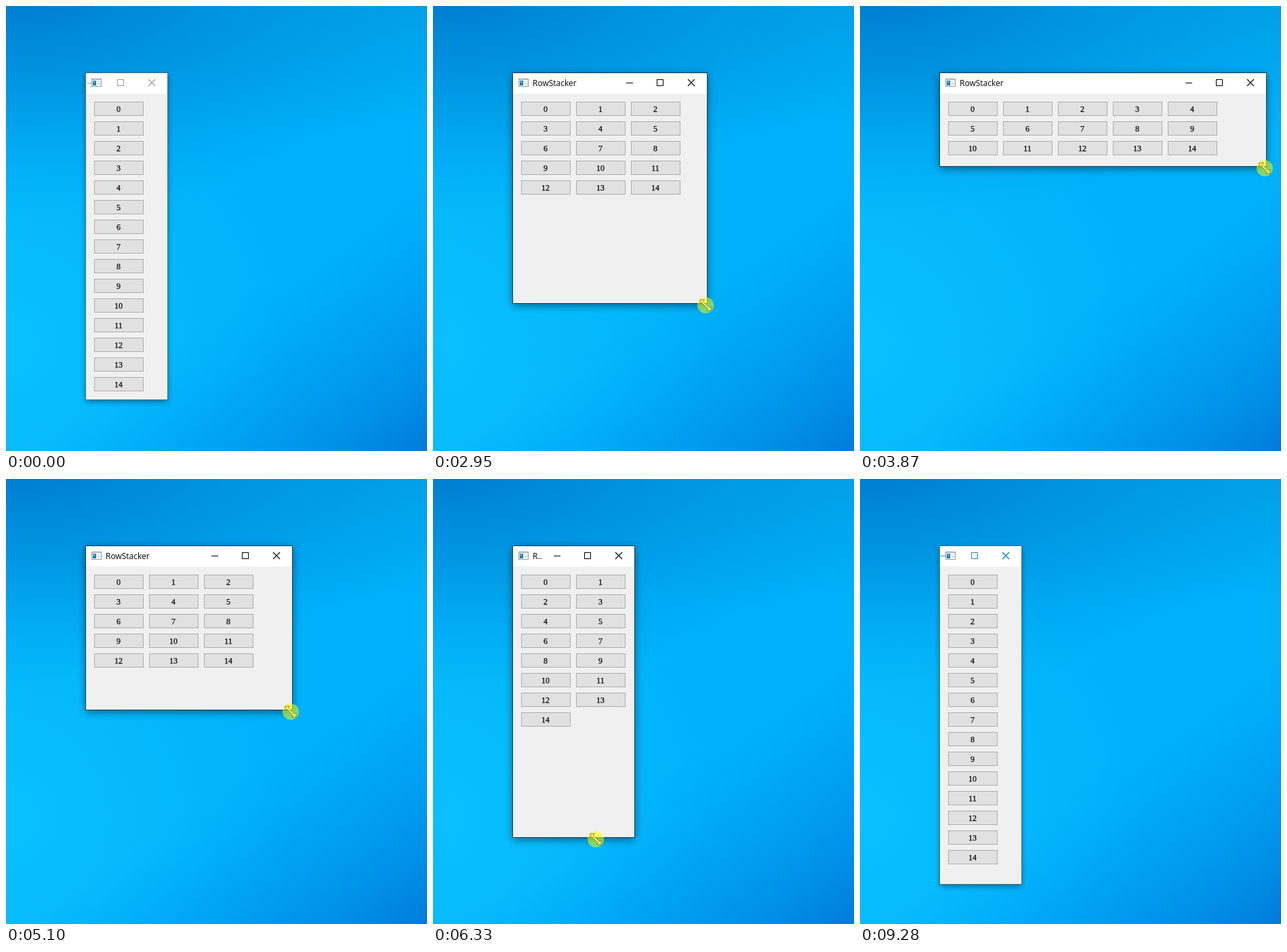
Animation of 621 by 656 pixels, one loop 9420 ms. Source, as an HTML page:

```html
<!DOCTYPE html>
<html lang="en">
<head>
<meta charset="utf-8">
<title>Flowing buttons</title>
<style>
  html, body { margin: 0; width: 100%; height: 100%; overflow: hidden; background: #00b0fa; }
  svg { display: block; width: 100%; height: 100%; }
  .title { font: 12px "Open Sans", "Noto Sans", sans-serif; }
  .label { font: 12px "Liberation Serif", serif; text-anchor: middle; stroke: #000; stroke-width: .25; }
</style>
</head>
<body>
<svg viewBox="0 0 621 656" preserveAspectRatio="none">
  <defs>
    <radialGradient id="glow" gradientUnits="userSpaceOnUse" cx="0" cy="500" r="420">
      <stop offset="0" stop-color="#0ac0ff"/>
      <stop offset="1" stop-color="#0ac0ff" stop-opacity="0"/>
    </radialGradient>
    <radialGradient id="dusk" gradientUnits="userSpaceOnUse" cx="0" cy="0" r="1"
      gradientTransform="translate(20 -30) scale(680 340)">
      <stop offset="0" stop-color="#0079ce"/>
      <stop offset=".4" stop-color="#0086d8" stop-opacity=".62"/>
      <stop offset="1" stop-color="#0096e4" stop-opacity="0"/>
    </radialGradient>
    <linearGradient id="top" gradientUnits="userSpaceOnUse" x1="0" y1="0" x2="0" y2="190">
      <stop offset="0" stop-color="#009ee6" stop-opacity=".8"/>
      <stop offset="1" stop-color="#009ee6" stop-opacity="0"/>
    </linearGradient>
    <linearGradient id="deep" gradientUnits="userSpaceOnUse" x1="621" y1="656" x2="415" y2="375">
      <stop offset="0" stop-color="#007bdc"/>
      <stop offset=".45" stop-color="#0090ec" stop-opacity=".65"/>
      <stop offset="1" stop-color="#00a0f4" stop-opacity="0"/>
    </linearGradient>
    <filter id="blurOn" filterUnits="userSpaceOnUse" x="60" y="40" width="621" height="656">
      <feGaussianBlur stdDeviation="6.5"/>
    </filter>
    <filter id="blurOff" filterUnits="userSpaceOnUse" x="60" y="40" width="621" height="656">
      <feGaussianBlur stdDeviation="4"/>
    </filter>
  </defs>
  <rect width="621" height="656" fill="#00b2fa"/>
  <rect width="621" height="656" fill="url(#glow)"/>
  <rect width="621" height="656" fill="url(#top)"/>
  <rect width="621" height="656" fill="url(#dusk)"/>
  <rect width="621" height="656" fill="url(#deep)"/>

  <rect id="shadow" x="118" y="102"/>
  <rect id="body" x="118" y="99" fill="#f0f0f0"/>
  <rect id="bar" x="118" y="99" height="30" fill="#fff"/>
  <rect id="edge" x="117.5" y="98.5" fill="none"/>
  <g id="controls" fill="none">
    <path d="M-119 113.5h10"/>
    <rect x="-73.5" y="108.5" width="9" height="9"/>
    <path id="close" d="M-28 108l10 10m0 -10l-10 10"/>
  </g>
  <g id="icon">
    <rect x="126.5" y="107.5" width="14" height="11" fill="#f4f6f7" stroke="#959ba0"/>
    <path d="M127 108.5h13" stroke="#c9ced2"/>
    <rect x="128" y="110" width="5" height="7" fill="#1f7fb4"/>
    <rect x="129" y="111" width="2" height="2" fill="#7fd0e4"/>
    <path d="M135 111.5h1m2 0h1M135 114.5h4" stroke="#b4bac0"/>
  </g>
  <text id="title" class="title" x="147" y="118"></text>
  <g id="buttons"></g>
  <g id="cursor">
    <path id="pointer" fill="#fff" stroke="#000"/>
    <circle id="press" r="12" fill="#ff0" fill-opacity=".52"/>
  </g>
</svg>
<script>
const LOOP = 9420, STEP = 76.9, COUNT = 15, NAME = "RowStacker";
const ACTIVE = 2180, RELEASE = 7330, INACTIVE = 9280;
const $ = id => document.getElementById(id);
const set = (el, attrs) => { for (const k in attrs) el.setAttribute(k, attrs[k]); };

const SHAPES = {
  arrow: "M.5 .5V16.5L4.3 13L7 18.5L9.3 17.5L6.8 12H11.5Z",
  side: "M-11 0L-6.5 -4.5V-1.5H6.5V-4.5L11 0L6.5 4.5V1.5H-6.5V4.5Z",
  corner: "M-8 -8H-1.5L-3.8 -5.7L5.7 3.8L8 1.5V8H1.5L3.8 5.7L-5.7 -3.8L-8 -1.5Z"
};

// cursor path: time, x, y
const PATH = [
  [230, 519, 624], [1075, 262, 582], [1150, 242.5, 578.5], [1309, 242.5, 578.5],
  [1310, 235.5, 578.5], [1629, 235.5, 578.5], [1630, 236, 581.5], [1799, 236, 581.5],
  [1800, 236, 583], [2180, 236, 582], [2334, 247, 550], [2949, 402, 441],
  [3103, 486, 379], [3872, 597, 239], [4103, 583, 234], [4180, 582, 233],
  [4487, 582, 233], [5102, 420, 343], [5487, 320, 421], [6333, 240, 531],
  [6486, 232, 556], [6947, 114, 600], [7328, 114, 600], [7332, 122, 590],
  [7486, 160, 557], [7635, 160, 557], [7640, 215, 590], [7794, 433, 648], [7871, 520, 670]
];

const buttons = Array.from({ length: COUNT }, (_, i) => {
  const ns = "http://www.w3.org/2000/svg";
  const g = document.createElementNS(ns, "g");
  const box = document.createElementNS(ns, "rect");
  const text = document.createElementNS(ns, "text");
  set(box, { x: .5, y: .5, width: 72, height: 20, fill: "#e1e1e1", stroke: "#adadad" });
  set(text, { x: 36, y: 15, class: "label" });
  text.textContent = i;
  g.append(box, text);
  $("buttons").append(g);
  return g;
});

// the screen was sampled about 13 times a second
function snap(t) {
  const from = t < 1200 ? 230 : ACTIVE;
  if (t < 230 || (t >= 1200 && t < ACTIVE)) return t;
  return from + Math.floor((t - from + 4) / STEP) * STEP;
}

function cursorAt(t) {
  const i = PATH.findIndex(p => p[0] > t);
  if (i < 0) return PATH[PATH.length - 1].slice(1);
  if (i === 0) return PATH[0].slice(1);
  const [a, b] = [PATH[i - 1], PATH[i]];
  const k = (t - a[0]) / (b[0] - a[0]);
  return [1, 2].map(j => a[j] + (b[j] - a[j]) * k);
}

const columns = right => Math.max(1, Math.floor((right - 134) / 81));
const minBottom = right => 145 + 29 * Math.ceil(COUNT / columns(right));

function windowSize(t, x, y) {
  if (t < ACTIVE) return [238, 580];
  if (t >= 6940) return [238, 597];
  let right = Math.round(x + 2), bottom = Math.round(y - 3);
  // a single column only fits once the window is tall enough
  if (t > 5000) right = Math.max(right, bottom < 580 ? 297 : 238);
  return [right, Math.max(bottom, minBottom(right))];
}

function drawWindow(t, right, bottom) {
  const active = t >= ACTIVE && t < INACTIVE, fading = t >= INACTIVE;
  const width = right - 118, height = bottom - 99;
  set($("shadow"), {
    width, height, filter: `url(#blur${active ? "On" : "Off"})`, "fill-opacity": active ? .52 : .45
  });
  set($("body"), { width, height });
  set($("bar"), { width });
  set($("edge"), {
    width: width + 1, height: height + 1,
    stroke: active ? "#143c50" : "#46707f"
  });
  set($("controls"), {
    transform: `translate(${right} 0)`,
    stroke: active ? "#000" : fading ? "#1a8fc4" : "#999"
  });
  set($("close"), { "stroke-width": fading ? 1.7 : 1.1 });

  const room = Math.floor((right - 284) / 6.6);
  $("title").textContent = room >= NAME.length ? NAME : room > 0 ? NAME.slice(0, room) + ".." : "";

  const cols = columns(right);
  buttons.forEach((b, i) => set(b, {
    transform: `translate(${130 + 81 * (i % cols)} ${141 + 29 * Math.floor(i / cols)})`
  }));
}

function drawCursor(t, x, y) {
  const shape = t < 1150 || t >= RELEASE ? "arrow" : t < 1630 ? "side" : "corner";
  set($("cursor"), {
    transform: `translate(${x} ${y})`,
    visibility: t >= 230 && t < 7860 ? "visible" : "hidden"
  });
  set($("pointer"), { d: SHAPES[shape] });
  set($("press"), { opacity: t >= ACTIVE && t < RELEASE ? 1 : 0 });
}

function render(time) {
  const t = time >= INACTIVE ? time : snap(time);
  const [x, y] = cursorAt(t);
  drawWindow(t, ...windowSize(t, x, y));
  drawCursor(t, x, y);
}

const start = performance.now();
function tick() {
  render((performance.now() - start) % LOOP);
  requestAnimationFrame(tick);
}
tick();
</script>
</body>
</html>
```
